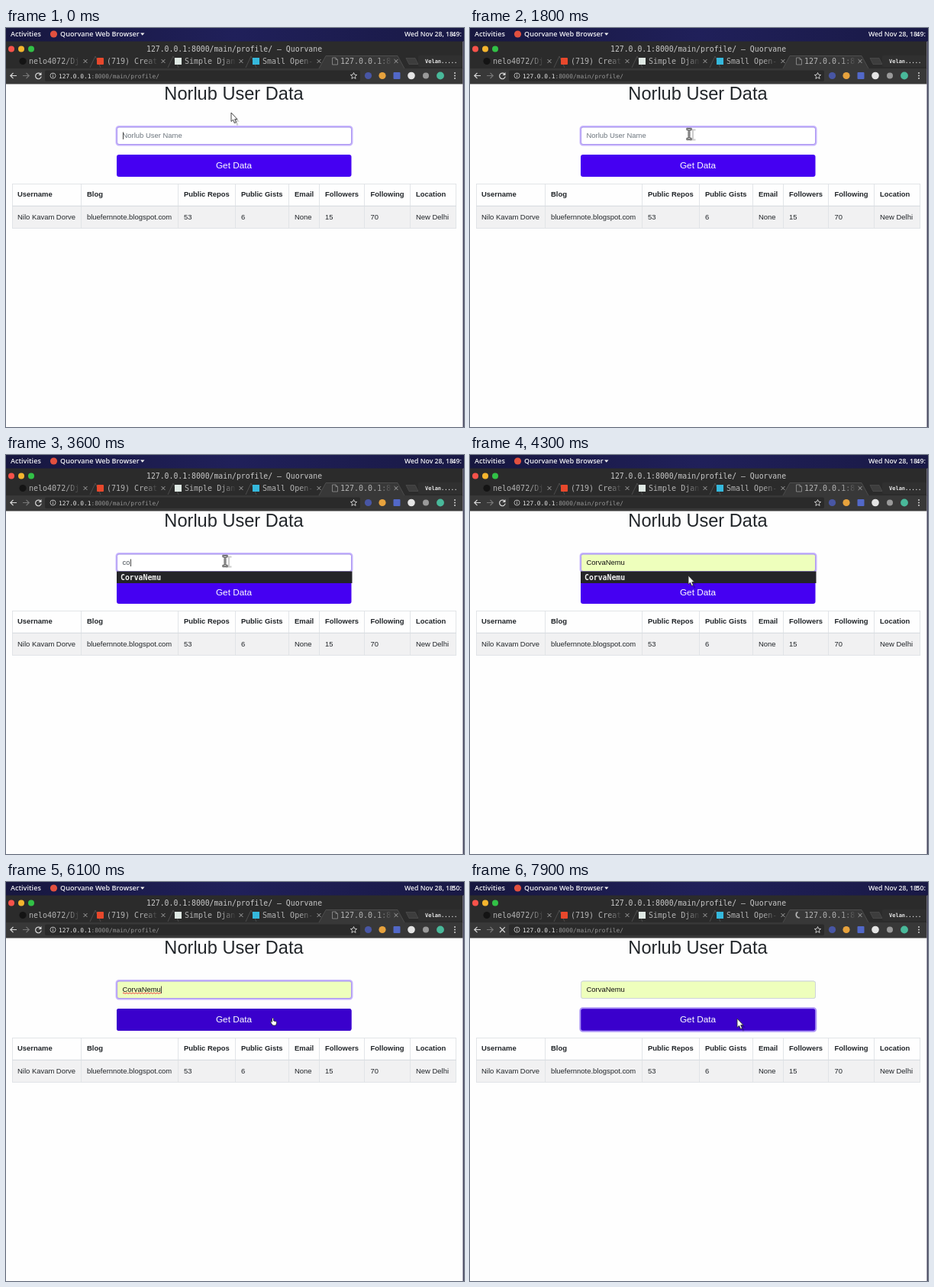
These frames come from a looping animation (600x523 px, 8000 ms). An HTML page:

```html
<!DOCTYPE html>
<html lang="en">
<head>
<meta charset="utf-8">
<title>Profile lookup</title>
<style>
html, body { margin: 0; width: 100%; height: 100%; overflow: hidden; background: #fefefe; }
svg { display: block; width: 600px; height: 523px; }
text { white-space: pre; }
.bar { font: 600 9.1px "Open Sans", "Noto Sans", sans-serif; fill: #f1f1f4; }
.mono { font: 9.8px "DejaVu Sans Mono", monospace; fill: #c9c9c9; }
.tab { font-size: 10px; fill: #b4b4b4; }
.page { font: 9.45px "Liberation Sans", Arial, sans-serif; fill: #212529; }
.bold { font-weight: bold; }
.line { fill: none; stroke: #d8d8d8; stroke-width: 1.2; }

/* One loop: 1% = 80 ms */
.cursor, .caret, .caret rect, .show, .turn { animation: 8s step-end infinite; }
.cursor { animation-name: travel; }
.arrow { animation-name: arrow; }
.beam { animation-name: beam; }
.hand { animation-name: hand; }
.caret { animation-name: caret; }
.caret rect { animation-name: blink; }
.hint { animation-name: hint; }
.one { animation-name: one; }
.two { animation-name: two; }
.filled { animation-name: filled; }
.list { animation-name: list; }
.spell { animation-name: spell; }
.early { animation-name: early; }
.late { animation-name: late; }
.hover { animation-name: hover; }
.idle { animation-name: idle; }
.busy { animation-name: busy; }
.turn { animation: turn 1s steps(10) infinite; transform-origin: 431px 43px; }

@keyframes travel {
  0% { transform: translate(295px, 111px); }
  5% { transform: translate(295px, 111px); animation-timing-function: steps(7); }
  13.75% { transform: translate(287px, 128px); animation-timing-function: steps(3); }
  17.5% { transform: translate(287px, 139px); }
  47.5% { transform: translate(287px, 139px); animation-timing-function: steps(4); }
  52.5% { transform: translate(286px, 158px); }
  62.5% { transform: translate(286px, 158px); animation-timing-function: steps(7); }
  71.25%, 100% { transform: translate(350px, 179px); }
}
@keyframes arrow { 0%, 51.25%, 85%, 100% { opacity: 1; } 15%, 66.25% { opacity: 0; } }
@keyframes beam { 0%, 51.25%, 100% { opacity: 0; } 15% { opacity: 1; } }
@keyframes hand { 0%, 85%, 100% { opacity: 0; } 66.25% { opacity: 1; } }
@keyframes caret {
  0% { transform: translateX(153px); }
  41.25% { transform: translateX(158px); }
  43.75% { transform: translateX(163px); }
  51.25%, 100% { transform: translateX(203px); }
}
@keyframes blink {
  0%, 12.5%, 27.5%, 41.25%, 57.5%, 72.5% { opacity: 1; }
  5%, 20%, 35%, 50%, 65%, 80%, 100% { opacity: 0; }
}
@keyframes hint { 0% { opacity: 1; } 41.25%, 100% { opacity: 0; } }
@keyframes one { 0%, 43.75%, 100% { opacity: 0; } 41.25% { opacity: 1; } }
@keyframes two { 0%, 51.25%, 100% { opacity: 0; } 43.75% { opacity: 1; } }
@keyframes filled { 0% { opacity: 0; } 51.25%, 100% { opacity: 1; } }
@keyframes list { 0%, 57.5%, 100% { opacity: 0; } 41.25% { opacity: 1; } }
@keyframes spell { 0%, 83.75%, 100% { opacity: 0; } 57.5% { opacity: 1; } }
@keyframes early { 0% { opacity: 1; } 58.75%, 100% { opacity: 0; } }
@keyframes late { 0% { opacity: 0; } 58.75%, 100% { opacity: 1; } }
@keyframes hover { 0% { opacity: 0; } 66.25%, 100% { opacity: 1; } }
@keyframes idle { 0% { opacity: 1; } 83.75%, 100% { opacity: 0; } }
@keyframes busy { 0% { opacity: 0; } 83.75%, 100% { opacity: 1; } }
@keyframes turn { to { transform: rotate(-360deg); } }
</style>
</head>
<body>
<svg viewBox="0 0 600 523">
  <defs>
    <linearGradient id="fade"><stop stop-color="#2b2b2b" stop-opacity="0"/><stop offset="1" stop-color="#2b2b2b"/></linearGradient>
    <linearGradient id="fadeOn"><stop stop-color="#383838" stop-opacity="0"/><stop offset="1" stop-color="#383838"/></linearGradient>
    <linearGradient id="sky"><stop stop-color="#17173f"/><stop offset=".5" stop-color="#20205a"/><stop offset="1" stop-color="#191945"/></linearGradient>
    <pattern id="wave" x="153" y="144" width="4" height="3" patternUnits="userSpaceOnUse">
      <path d="M0 2L1 1L3 2.4L4 2" fill="none" stroke="#e33" stroke-width=".9"/>
    </pattern>
    <path id="close" d="M-2.4-2.4l4.8 4.8m0-4.8l-4.8 4.8" fill="none" stroke="#a5a5a5"/>
    <path id="edge" d="M-5 52L2 37M9 52L2 37" fill="none" stroke="#555" stroke-width=".8"/>
  </defs>

  <rect width="600" height="523" fill="#fefefe"/>

  <!-- Desktop bar -->
  <rect width="600" height="18" fill="url(#sky)"/>
  <text class="bar" x="6" y="11.2">Activities</text>
  <circle cx="62.500" cy="8" r="4.600" fill="#e2503f"/>
  <text class="bar" x="71" y="11.2" font-size="9">Quorvane Web Browser</text>
  <path d="M176 6.500h5.500l-2.750 3.200z" fill="#eee"/>
  <g class="bar" style="font-size:8.7px">
    <text x="522" y="11">Wed Nov 28, 18:</text>
    <text class="show early" x="584.500" y="11">49:</text>
    <text class="show late" x="584.500" y="11">50:</text>
  </g>

  <!-- Browser window -->
  <rect y="17.500" width="598.500" height="36" fill="#2b2b2b"/>
  <circle cx="7" cy="27.500" r="4" fill="#f7524a"/>
  <circle cx="20" cy="27.500" r="4" fill="#f5b52e"/>
  <circle cx="33" cy="27.500" r="4" fill="#32c146"/>
  <text class="mono" x="184" y="31">127.0.0.1:8000/main/profile/ – Quorvane</text>

  <path d="M410 53.500L419 36.500H513L522 53.500z" fill="#383838"/>
  <use href="#edge" x="115"/><use href="#edge" x="217"/><use href="#edge" x="319"/>
  <path d="M410 53L419 36.500H513L522 53" fill="none" stroke="#555" stroke-width=".8"/>
  <path d="M524 39.500h12l4 8h-12z" fill="#3d3d3d" stroke="#555" stroke-width=".6"/>
  <rect x="540" y="36" width="58" height="15" rx="2" fill="#303030"/>
  <text class="mono bold" x="549" y="46" style="font-size:7px;fill:#e4e4e4">Velan.....</text>

  <circle cx="22" cy="43.500" r="4.600" fill="#141414"/>
  <rect x="119" y="39" width="9" height="9" rx="1" fill="#e8482c"/>
  <rect x="221" y="39" width="9" height="9" fill="#dfe9e4"/>
  <rect x="323" y="39" width="9" height="9" fill="#35b8dc"/>
  <g class="mono tab">
    <text class="tab" x="30" y="47">nelo4072/Dj</text>
    <text class="tab" x="132" y="47">(719) Creat</text>
    <text class="tab" x="234" y="47">Simple Djan</text>
    <text class="tab" x="336" y="47">Small Open-</text>
    <text class="tab" x="438" y="47">127.0.0.1:8</text>
  </g>
  <g fill="url(#fade)">
    <rect x="78" y="38" width="20" height="12"/><rect x="180" y="38" width="20" height="12"/>
    <rect x="282" y="38" width="20" height="12"/><rect x="384" y="38" width="20" height="12"/>
  </g>
  <rect x="486" y="38" width="20" height="12" fill="url(#fadeOn)"/>
  <use href="#close" x="104" y="43.500"/><use href="#close" x="206" y="43.500"/><use href="#close" x="308" y="43.500"/>
  <use href="#close" x="410" y="43.500"/><use href="#close" x="511" y="43.500"/>
  <path class="show idle" d="M427.500 39h4.500l2.500 2.500v6.500h-7zM432 39v2.500h2.500" fill="none" stroke="#8b8b8b" stroke-width=".9"/>
  <g class="show busy"><path class="turn" d="M427.600 41A4 4 0 0 0 434 45.600" fill="none" stroke="#ddd" stroke-width="1.300"/></g>

  <!-- Toolbar -->
  <rect y="53" width="598.500" height="20.500" fill="#383838"/>
  <rect x="51" y="55.500" width="413" height="14.500" rx="2" fill="#2a2a2a"/>
  <path class="line" d="M14 62.500H6M9.500 58.800L5.800 62.500L9.500 66.200"/>
  <path class="line" d="M22 62.500h8M26.500 58.800L30.200 62.500L26.500 66.200" style="stroke:#777"/>
  <g class="show idle">
    <path class="line" d="M45.300 60.400A3.800 3.800 0 1 0 46.200 63.500"/>
    <path d="M46.500 58v4h-4z" fill="#d8d8d8"/>
  </g>
  <path class="line show busy" d="M39 59.200l6.800 6.800m0-6.800l-6.800 6.800"/>
  <circle cx="61.500" cy="62.500" r="3.500" class="line" style="stroke-width:.8"/>
  <path class="line" d="M61.500 62v2.400M61.500 60v1" style="stroke-width:.9"/>
  <text class="mono" x="69" y="65.500" style="font-size:7.84px;fill:#e6e6e6">127.0.0.1<tspan fill="#969696">:8000/main/profile/</tspan></text>
  <path class="line" d="M455.500 58.500l1.200 2.700 2.900.3-2.200 2 .7 2.900-2.600-1.600-2.600 1.600.7-2.900-2.200-2 2.900-.3z" style="stroke-width:.9"/>
  <circle cx="474.500" cy="62.500" r="4.600" fill="#4856a5"/>
  <circle cx="493" cy="62.500" r="4.600" fill="#e7a23d"/>
  <rect x="507.500" y="58" width="9" height="9" rx="1" fill="#5268c8"/>
  <circle cx="531" cy="62.500" r="4.800" fill="#e5e5e5"/>
  <circle cx="550" cy="62.500" r="4" fill="#9a9a9a"/>
  <circle cx="569" cy="62.500" r="4.900" fill="#49b99a"/>
  <g fill="#d0d0d0"><circle cx="588" cy="59" r="1"/><circle cx="588" cy="62.500" r="1"/><circle cx="588" cy="66" r="1"/></g>
  <rect x="598.500" y="17" width="1.500" height="506" fill="#46465f"/>

  <!-- Page -->
  <g class="page">
    <text x="298.500" y="94" text-anchor="middle" style="font-size:23.6px">Norlub User Data</text>

    <rect x="145.500" y="130" width="307" height="22.500" rx="2.500" fill="#fff" stroke="#ced4da"/>
    <rect class="show filled" x="145.500" y="130" width="307" height="22.500" rx="2.500" fill="#eeffbc" stroke="#ced4da"/>
    <g class="show idle" fill="none">
      <rect x="144.500" y="129" width="309" height="24.500" rx="3.500" stroke="#c7b5fc" stroke-width="2"/>
      <rect x="145.500" y="130" width="307" height="22.500" rx="2.500" stroke="#a48bf3" stroke-width=".8"/>
    </g>
    <text class="show hint" x="152.500" y="144.300" fill="#6c757d" style="fill:#6c757d">Norlub User Name</text>
    <text class="show one" x="152.500" y="144.300" style="fill:#495057">c</text>
    <text class="show two" x="152.500" y="144.300" style="fill:#495057">co</text>
    <text class="show filled" x="152.500" y="144.300" style="fill:#111">CorvaNemu</text>
    <rect class="show spell" x="153" y="144" width="50" height="3" fill="url(#wave)"/>
    <g class="caret"><rect y="136.500" width=".9" height="9.500" fill="#333"/></g>

    <rect x="145" y="166" width="307.500" height="29" rx="3" fill="#4500f2"/>
    <rect class="show hover" x="145" y="166" width="307.500" height="29" rx="3" fill="#3a00cc"/>
    <rect class="show busy" x="144.300" y="165.300" width="309" height="30.500" rx="3.500" fill="none" stroke="#ab93f5" stroke-width="2"/>
    <text x="298.500" y="183.800" text-anchor="middle" style="font-size:11.8px;fill:#fff">Get Data</text>

    <g class="show list">
      <rect x="145" y="152.500" width="308.500" height="15.500" fill="#242428"/>
      <text class="mono bold" x="150" y="163.600" style="fill:#f0f0f0">CorvaNemu</text>
    </g>

    <rect x="8" y="233" width="582" height="29.500" fill="#f1f1f2"/>
    <path d="M8 204.500H590M8 262.500H590M8.500 204V262.500M98.500 204V262.500M225.500 204V262.500M300.500 204V262.500M370.500 204V262.500M410.500 204V262.500M469.500 204V262.500M529.500 204V262.500M589.500 204V262.500" fill="none" stroke="#dfe2e6" stroke-width=".9"/>
    <path d="M8 233.300H590" stroke="#dadee2" stroke-width="1.200"/>
    <g class="bold">
      <text x="15" y="221">Username</text><text x="106" y="221">Blog</text>
      <text x="233" y="221">Public Repos</text><text x="308" y="221">Public Gists</text>
      <text x="378" y="221">Email</text><text x="418" y="221">Followers</text>
      <text x="477.500" y="221">Following</text><text x="537" y="221">Location</text>
    </g>
    <text x="15" y="250.500">Nilo Kavam Dorve</text><text x="106" y="250.500">bluefernnote.blogspot.com</text>
    <text x="233" y="250.500">53</text><text x="308" y="250.500">6</text>
    <text x="378" y="250.500">None</text><text x="418" y="250.500">15</text>
    <text x="477.500" y="250.500">70</text><text x="537" y="250.500">New Delhi</text>
  </g>

  <!-- Pointer -->
  <g class="cursor">
    <g class="show arrow">
      <path d="M3 3V14.500L5.500 12.500 7.500 17 9.500 16 7.700 11.800H11z" fill="#000" opacity=".18"/>
      <path d="M0 0V11.500L2.600 9.300 4.500 13.500 6.500 12.600 4.700 8.600H8z" fill="#fff" stroke="#333" stroke-width=".9"/>
    </g>
    <g class="show beam" fill="none">
      <path d="M1.500-5.500H8.500M5 -5.500V7.500M1.500 7.500H8.500" stroke="#000" stroke-opacity=".2" stroke-width="2"/>
      <path d="M-3.500-6.500H3.500M0-6.500V6.500M-3.500 6.500H3.500" stroke="#333" stroke-width="2.800"/>
      <path d="M-3-6.500H3M0-6.500V6.500M-3 6.500H3" stroke="#eee" stroke-width=".9"/>
    </g>
    <path class="show hand" d="M-1.500 0Q-.5-1.500.5 0V3L3.800 3.800Q4.800 4.200 4.500 6L3.500 9H-.5L-3 5.500Q-3-.0 -1.500 4.500z" fill="#fff" stroke="#222" stroke-width=".8"/>
  </g>
</svg>
</body>
</html>
```
